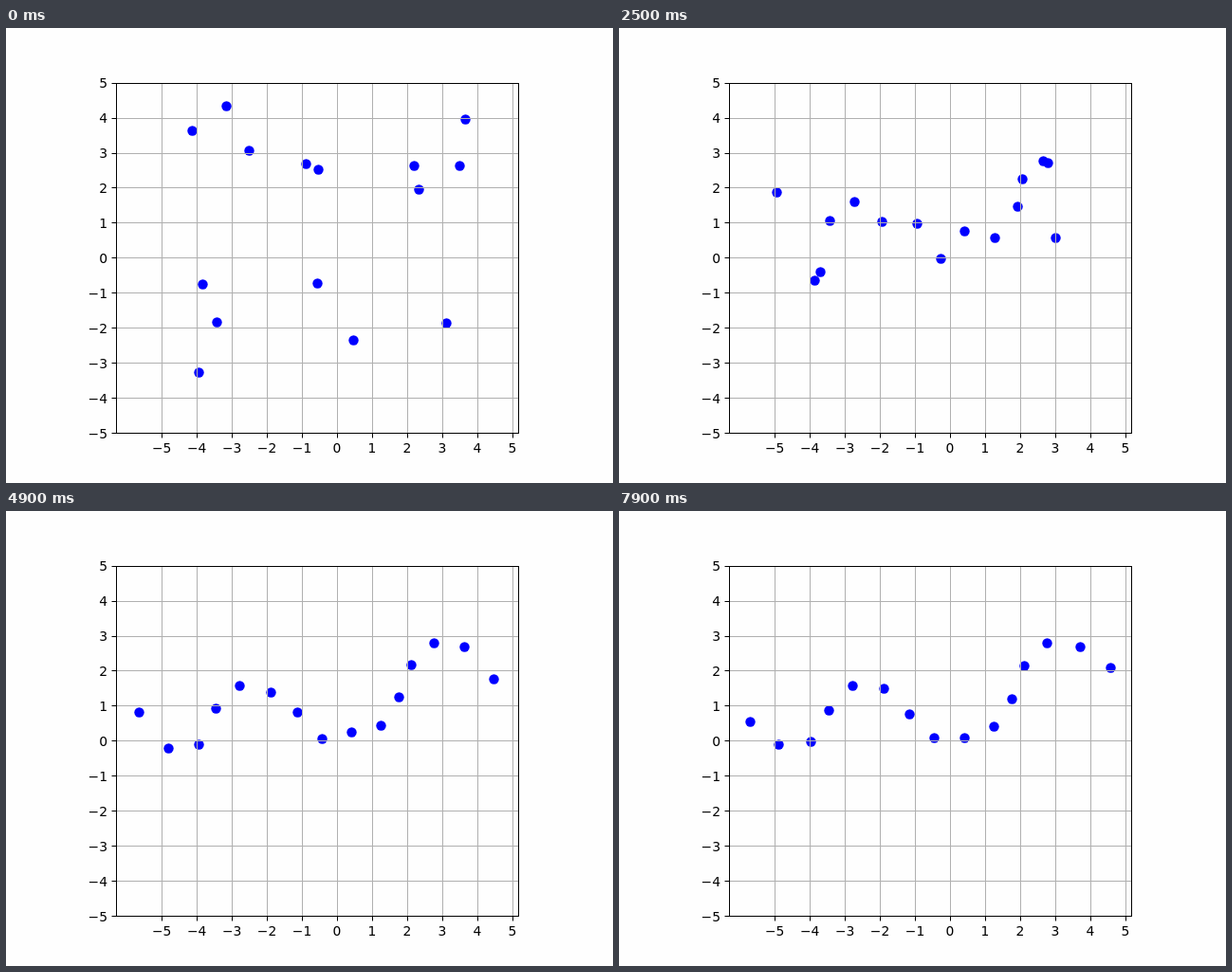
Animation, 640 px wide and 480 px high, one loop 8 s. Source, as an HTML page:

```html
<!DOCTYPE html>
<html lang="en">
<head>
<meta charset="utf-8">
<title>Scatter relaxation</title>
<style>
  html, body { margin: 0; width: 100%; height: 100%; overflow: hidden; background: #fefefe; }
  svg { display: block; }
  text { font: 13.89px "DejaVu Sans", sans-serif; fill: #000; }
  .grid { stroke: #b0b0b0; }
  .axis { stroke: #000; fill: none; }
  .dot { fill: #00f; }
</style>
</head>
<body>
<svg id="plot" width="640" height="480" viewBox="0 0 640 480"></svg>
<script>
const LOOP = 8000, STEP = 100, GATHER = 900;
const UNIT = 36.96, X0 = 349, Y0 = 242.4, TICK = 5;
const LEFT = 116.5, RIGHT = 540.5, TOP = 58.5, BOTTOM = 427.5;

const plot = document.getElementById("plot");
const dots = [];

function add(tag, attrs, text) {
  const el = document.createElementNS("http://www.w3.org/2000/svg", tag);
  for (const key in attrs) el.setAttribute(key, attrs[key]);
  if (text) el.textContent = text;
  plot.append(el);
  return el;
}

const line = (cls, x1, y1, x2, y2) => add("line", { class: cls, x1, y1, x2, y2 });
const label = v => (v < 0 ? "\u2212" : "") + Math.abs(v);
const snap = v => Math.round(v) + 0.5;
const mix = (a, b, u) => a + (b - a) * u;

function dot(start, gathered, settled) {
  dots.push({ el: add("circle", { class: "dot", r: 5.2 }), start, gathered, settled });
}

// The chain of dots from left to right: scattered start, gathered pose, settled pose.
dot([232, 82], [238, 139], [138, 223]);
dot([328, 269], [304, 279], [168, 246]);
dot([203, 363], [237, 267], [202, 243]);
dot([196, 108], [224, 198], [221, 210]);
dot([256, 129], [254, 183], [246, 184]);
dot([207, 270], [273, 215], [279, 187]);
dot([316, 143], [334, 201], [306, 214]);
dot([366, 329], [359, 246], [332, 239]);
dot([329, 149], [363, 197], [364, 239]);
dot([464, 311], [398, 217], [395, 227]);
dot([478, 145], [436, 182], [414, 198]);
dot([435, 170], [420, 156], [427, 163]);
dot([484, 96], [436, 140], [451, 139]);
dot([430, 145], [363, 141], [486, 143]);
dot([222, 310], [309, 259], [518, 164]);

// Grid and ticks lie over the dots.
for (let v = -5; v <= 5; v++) {
  const x = X0 + UNIT * v, y = Y0 - UNIT * v;
  line("grid", snap(x), TOP, snap(x), BOTTOM);
  line("grid", LEFT, snap(y), RIGHT, snap(y));
  line("axis", snap(x), BOTTOM, snap(x), BOTTOM + TICK);
  line("axis", LEFT - TICK, snap(y), LEFT, snap(y));
  add("text", { x, y: 448, "text-anchor": "middle" }, label(v));
  add("text", { x: 107, y: Math.round(y + 5.5), "text-anchor": "end" }, label(v));
}
add("rect", { class: "axis", x: LEFT, y: TOP, width: RIGHT - LEFT, height: BOTTOM - TOP });

// Quick pull together, slowing down.
const gather = u => u * (1.5 - 0.5 * u);

// Slow unfolding: sideways motion dies out sooner than vertical motion.
const settle = (t, tau, power) => 1 - Math.exp(-((t / tau) ** power));

function draw(now) {
  const t = Math.floor((now % LOOP) / STEP) * STEP;
  const rest = t - GATHER;
  const late = rest >= 0;
  const ux = late ? settle(rest, 1300, 1.2) : gather(t / GATHER);
  const uy = late ? settle(rest, 2500, 1.5) : gather(t / GATHER);
  for (const { el, start, gathered, settled } of dots) {
    const from = late ? gathered : start;
    const to = late ? settled : gathered;
    el.setAttribute("cx", snap(mix(from[0], to[0], ux)));
    el.setAttribute("cy", snap(mix(from[1], to[1], uy)));
  }
}

function tick() {
  draw(performance.now());
  requestAnimationFrame(tick);
}
draw(0);
requestAnimationFrame(tick);
</script>
</body>
</html>
```
